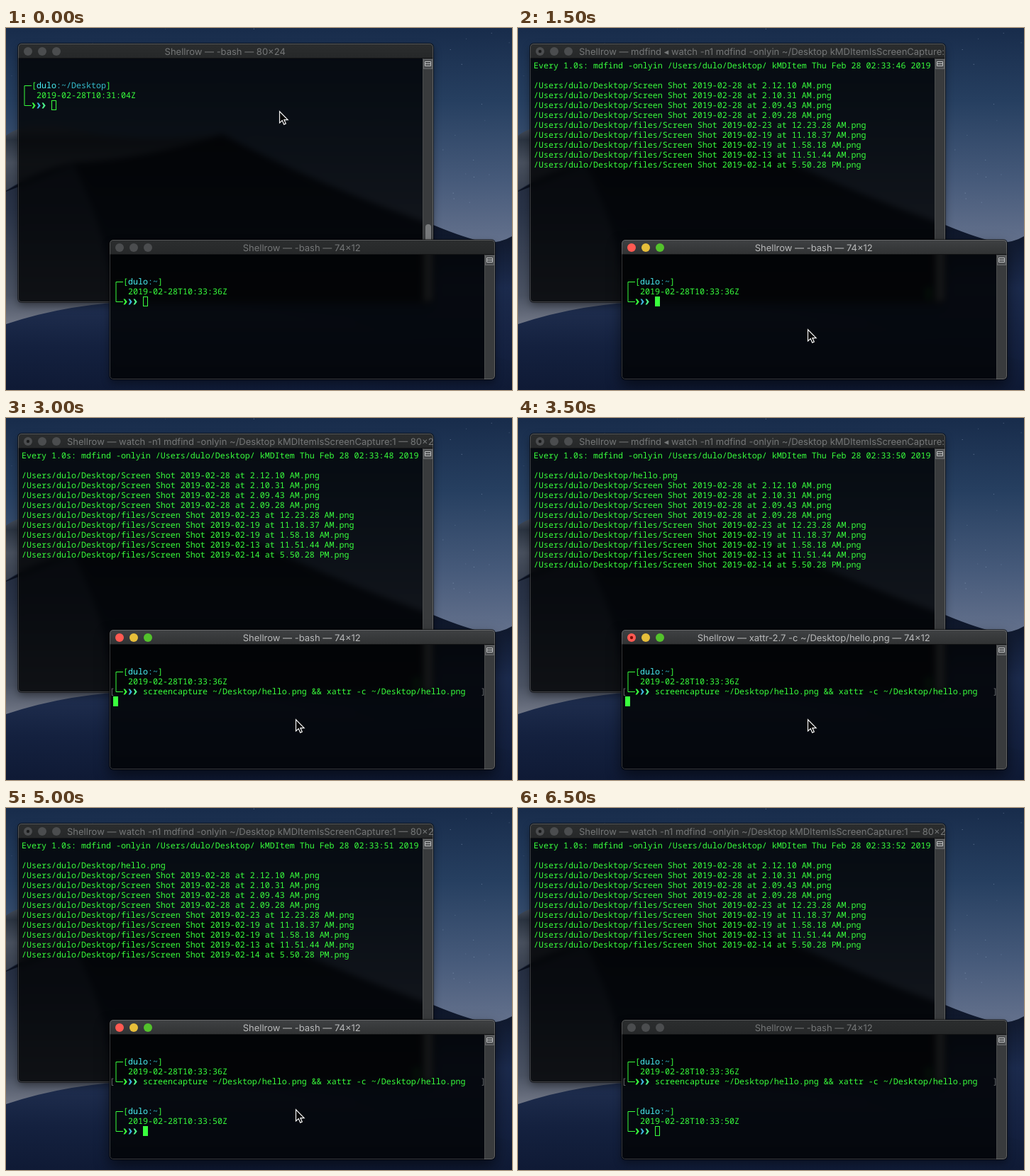
An HTML page that plays this animation: 713x511 px, repeating every 7000 ms.

```html
<!DOCTYPE html>
<html lang="en">
<head>
<meta charset="utf-8">
<title>Watching a folder</title>
<style>
  html, body { margin: 0; width: 100%; height: 100%; overflow: hidden; background: #10192f; }
  #stage { position: relative; width: 713px; height: 511px; overflow: hidden; }
  #wallpaper, #mouse { position: absolute; left: 0; top: 0; }
  #mouse { z-index: 5; }
  .win {
    position: absolute; z-index: 1; overflow: hidden; border-radius: 5px;
    background: rgba(3, 4, 6, .83); backdrop-filter: blur(4px);
    box-shadow: 0 0 0 1px rgba(0, 0, 0, .55), 0 5px 12px rgba(0, 0, 0, .4);
  }
  .win.active { z-index: 2; box-shadow: 0 0 0 1px rgba(0, 0, 0, .6), 0 9px 20px rgba(0, 0, 0, .55); }
  .win svg { display: block; }
  text { white-space: pre; text-rendering: geometricPrecision; }
  .mono { font: 11.667px "Noto Sans Mono", "DejaVu Sans Mono", monospace; fill: #39ff3d; }
  .title { font: 13px Inter, "DejaVu Sans", sans-serif; }
</style>
</head>
<body>
<div id="stage">
  <svg id="wallpaper" width="713" height="511" viewBox="0 0 713 511">
    <defs>
      <linearGradient id="sky" x2="0" y2="1">
        <stop offset="0" stop-color="#182c4b"/><stop offset=".2" stop-color="#263f60"/>
        <stop offset=".42" stop-color="#465a7a"/><stop offset=".6" stop-color="#65728d"/>
      </linearGradient>
      <linearGradient id="far" x2="0" y2="1">
        <stop offset="0" stop-color="#4d5562"/><stop offset=".12" stop-color="#2b3441"/>
        <stop offset=".32" stop-color="#48505e"/><stop offset="1" stop-color="#1c2434"/>
      </linearGradient>
      <linearGradient id="slope" x2="0" y2="1">
        <stop offset="0" stop-color="#1c2436"/><stop offset=".4" stop-color="#293347"/>
        <stop offset=".85" stop-color="#4b5363"/><stop offset="1" stop-color="#717786"/>
      </linearGradient>
      <linearGradient id="shade" x2="0" y2="1">
        <stop offset="0" stop-color="#070a13"/><stop offset=".4" stop-color="#10192d"/>
        <stop offset=".6" stop-color="#1b2a4c"/><stop offset="1" stop-color="#101b38"/>
      </linearGradient>
      <linearGradient id="near" x2="0" y2="1">
        <stop offset="0" stop-color="#202f50"/><stop offset=".5" stop-color="#14213f"/>
        <stop offset="1" stop-color="#0f1a35"/>
      </linearGradient>
    </defs>
    <rect width="713" height="511" fill="url(#sky)"/>
    <g id="stars" fill="#a9bdd8"></g>
    <path d="M0 152Q30 128 110 146T305 150V300H0Z" fill="url(#far)"/>
    <path d="M0 229Q50 198 95 190Q200 185 305 150L360 400L0 418Z" fill="url(#slope)"/>
    <path d="M0 230Q50 200 95 190Q200 185 305 150Q430 218 602 278Q650 298 678 303Q698 303 713 294V511H140Q175 350 95 192Q40 216 0 231Z" fill="url(#shade)"/>
    <path d="M0 418Q90 388 190 386Q400 386 713 470V511H0Z" fill="url(#near)"/>
  </svg>
  <div class="win" id="watcher"></div>
  <div class="win" id="shell"></div>
  <svg id="mouse" width="713" height="511">
    <path d="M0 0V16.2L3.7 12.8 6.2 18.3 8.8 17.1 6.4 11.8H11.6Z" fill="#050505" stroke="#f4f4f4" stroke-width="1.2"/>
  </svg>
</div>
<script>
const LOOP = 7000, TICK = 250, CELL = 7, ROW = 14;
const GREEN = '#39ff3d', APP = 'Shellrow', USER = 'dulo';
const $ = id => document.getElementById(id);
const esc = s => s.replace(/&/g, '&amp;').replace(/</g, '&lt;');

// Latest value in a [time, value] schedule.
const at = (schedule, t) => schedule.reduce((v, [start, next]) => t >= start ? next : v, schedule[0][1]);

const rect = (x, y, w, h, fill, more = '') =>
  `<rect x="${x}" y="${y}" width="${w}" height="${h}" fill="${fill}" ${more}/>`;

const windows = {
  watcher: { x: 17, y: 22, w: 585, h: 365, textX: 5, textY: 24 },
  shell: { x: 146, y: 299, w: 543, h: 197, textX: 5, textY: 24 },
};

const WATCH = 'watch -n1 mdfind -onlyin ~/Desktop kMDItemIsScreenCapture:1';
const TYPED_WATCH = "watch -n1 mdfind -onlyin ~/Desktop 'kMDItemIsScreenCapture:1'";
const CAPTURE = 'screencapture ~/Desktop/hello.png && xattr -c ~/Desktop/hello.png';
const SHOTS = [
  '02-28 at 2.12.10 AM', '02-28 at 2.10.31 AM', '02-28 at 2.09.43 AM', '02-28 at 2.09.28 AM',
  '02-23 at 12.23.28 AM', '02-19 at 11.18.37 AM', '02-19 at 1.58.18 AM',
  '02-13 at 11.51.44 AM', '02-14 at 5.50.28 PM',
].map((s, i) => `/Users/${USER}/Desktop/${i > 3 ? 'files/' : ''}Screen Shot 2019-${s}.png`);

const FOCUS = [[0, ''], [250, 'watcher'], [1500, 'shell'], [6500, '']];
const MOUSE = [[0, [385, 117]], [250, [374, 134]], [1500, [408, 425]], [6250, null]];
const SECONDS = [[1250, 46], [1750, 47], [2500, 48], [3250, 49], [3500, 50], [4750, 51], [5750, 52]];
const SEARCHING = [[1250, true], [1750, false], [2250, true], [2500, false], [3250, true],
  [3750, false], [5750, true], [6000, false]];
const CURSOR_ON = [[0, true], [2000, false], [2500, true], [4500, false], [5000, true],
  [5500, false], [6000, true]];
const JOB = [[0, '-bash'], [3250, 'screencapture ~/Desktop/hello.png'],
  [3500, 'xattr-2.7 -c ~/Desktop/hello.png'], [3750, '-bash']];

function textAt(win, col, row, str, fill = GREEN) {
  const x = win.textX + col * CELL, y = win.textY + row * ROW + 11;
  return `<text class="mono" x="${x}" y="${y}" style="fill:${fill}">${esc(str)}</text>`;
}

function cursor(win, col, row, focused, on = true) {
  const x = win.textX + col * CELL, y = win.textY + row * ROW;
  if (!focused) return rect(x + .5, y + .5, 6, 13, 'none', `stroke="${GREEN}"`);
  return on ? rect(x, y, 7, 14, GREEN) : '';
}

function prompt(win, row, path, stamp) {
  const x = win.textX, top = win.textY + row * ROW + 7.5;
  const chevrons = [GREEN, '#3db4dc', '#4cf58a'].map((color, i) =>
    `<path d="M${x + 14.5 + i * CELL} ${top + 24}h2.2l3 4-3 4h-2.2l2.4-4z" fill="${color}"/>`).join('');
  const name = 3 + USER.length;
  return `<path d="M${x + 14} ${top}H${x + 4}V${top + 28}H${x + 14}" fill="none" stroke="${GREEN}"/>` +
    textAt(win, 2, row, '[') + textAt(win, 3, row, USER, '#4af2f5') +
    textAt(win, name, row, ':' + path, '#35bccb') + textAt(win, name + 1 + path.length, row, ']') +
    textAt(win, 3, row + 1, stamp) + chevrons;
}

function frame(win, { title, active, busy, left }) {
  const { w, h } = win;
  const lights = active ? ['#ff5a52', '#e6be3a', '#53c22c'] : Array(3).fill('#4b4d4f');
  const buttons = lights.map((c, i) => `<circle cx="${14 + i * 20}" cy="11" r="6" fill="${c}"/>`).join('');
  const dot = busy ? `<circle cx="14" cy="11" r="2.2" fill="${active ? '#7e0d08' : '#1b1c1d'}"/>` : '';
  const anchor = left ? 'x="69"' : `x="${w / 2 - .8}" text-anchor="middle"`;
  const bar = id => `<linearGradient id="${id}" x2="0" y2="1"><stop stop-color="${active ? '#3f4143' : '#2b2d2e'}"/>` +
    `<stop offset="1" stop-color="${active ? '#303233' : '#262829'}"/></linearGradient>`;
  const id = 'bar' + w;
  return bar(id) + rect(0, 0, w, 21, `url(#${id})`) + rect(0, 20, w, 1, '#141516') + buttons + dot +
    `<text class="title" ${anchor} y="16" fill="${active ? '#b9babb' : '#747677'}">${esc(title)}</text>` +
    rect(w - 15, 21, 15, h - 21, '#393b3d') + rect(w - 15, 21, 1, h - 21, '#4a4c4d') +
    rect(w - 13.5, 22.5, 12, 13, '#4c4e50', 'stroke="#67696b"') +
    `<path d="M${w - 11.5} 25.5h8v6h-8zm0 3h8" fill="none" stroke="#bfc1c2"/>`;
}

function paint(id, active, body) {
  const win = windows[id], el = $(id);
  el.classList.toggle('active', active);
  el.innerHTML = `<svg width="${win.w}" height="${win.h}">${body}` +
    rect(.5, .5, win.w - 1, win.h - 1, 'none', 'rx="4.5" stroke="#fff" stroke-opacity=".2"') + '</svg>';
}

function drawWatcher(t, active) {
  const win = windows.watcher, running = t >= 1250;
  let title = `${APP} — -bash — 80×24`, body = '';
  if (running) {
    title = `${APP} — ` + (at(SEARCHING, t)
      ? 'mdfind ◂ ' + WATCH.slice(0, -1) + '…' : WATCH + ' — 80×24');
    const lines = [
      `Every 1.0s: mdfind -onlyin /Users/${USER}/Desktop/ kMDItem Thu Feb 28 02:33:${at(SECONDS, t)} 2019`, '',
      ...(t >= 3500 && t < 5750 ? [`/Users/${USER}/Desktop/hello.png`] : []), ...SHOTS,
    ];
    body = lines.map((line, row) => textAt(win, 0, row, line)).join('') + cursor(win, 79, 23, active);
  } else if (t >= 1000) {
    body = cursor(win, 0, 0, active);
  } else {
    const typed = t >= 750 ? TYPED_WATCH : '';
    body = prompt(win, 2, '~/Desktop', '2019-02-28T10:31:04Z') +
      textAt(win, 6, 4, typed) + cursor(win, 6 + typed.length, 4, active);
  }
  const thumbY = t < 1000 ? 255 : 283;
  paint('watcher', active, frame(win, { title, active, busy: running, left: running }) +
    rect(574, thumbY, 8, 362 - thumbY, '#77797b', 'rx="4"') + body);
}

function drawShell(t, active) {
  const win = windows.shell, on = at(CURSOR_ON, t), job = at(JOB, t);
  const typed = t >= 2500 ? CAPTURE : '';
  let body = prompt(win, 2, '~', '2019-02-28T10:33:36Z') + textAt(win, 6, 4, typed);
  if (t >= 3000) body += textAt(win, -.7, 4, '[', '#6b6e70') + textAt(win, 74, 4, ']', '#6b6e70');
  if (t >= 3750) body += prompt(win, 7, '~', '2019-02-28T10:33:50Z') + cursor(win, 6, 9, active, on);
  else if (t >= 3000) body += cursor(win, 0, 5, active, on);
  else body += cursor(win, 6 + typed.length, 4, active, on);
  paint('shell', active, frame(win, { title: `${APP} — ${job} — 74×12`, active, busy: job !== '-bash' }) + body);
}

function draw(t) {
  const focus = at(FOCUS, t), mouse = at(MOUSE, t);
  drawWatcher(t, focus === 'watcher');
  drawShell(t, focus === 'shell');
  $('mouse').style.display = mouse ? '' : 'none';
  if (mouse) $('mouse').firstElementChild.setAttribute('transform', `translate(${mouse[0] + .5} ${mouse[1] + .8})`);
}

for (const [id, { x, y, w, h }] of Object.entries(windows))
  Object.assign($(id).style, { left: x + 'px', top: y + 'px', width: w + 'px', height: h + 'px' });

let seed = 7;
const random = () => (seed = seed * 16807 % 2147483647) / 2147483647;
$('stars').innerHTML = Array.from({ length: 90 }, () =>
  rect((random() * 713).toFixed(1), (random() * 270).toFixed(1), 1, 1, '#a9bdd8',
    `opacity="${(.15 + random() * .4).toFixed(2)}"`)).join('');

let shown = -1;
const start = performance.now();
function loop() {
  const t = Math.floor((performance.now() - start) % LOOP / TICK) * TICK;
  if (t !== shown) draw(shown = t);
  requestAnimationFrame(loop);
}
loop();
</script>
</body>
</html>
```
